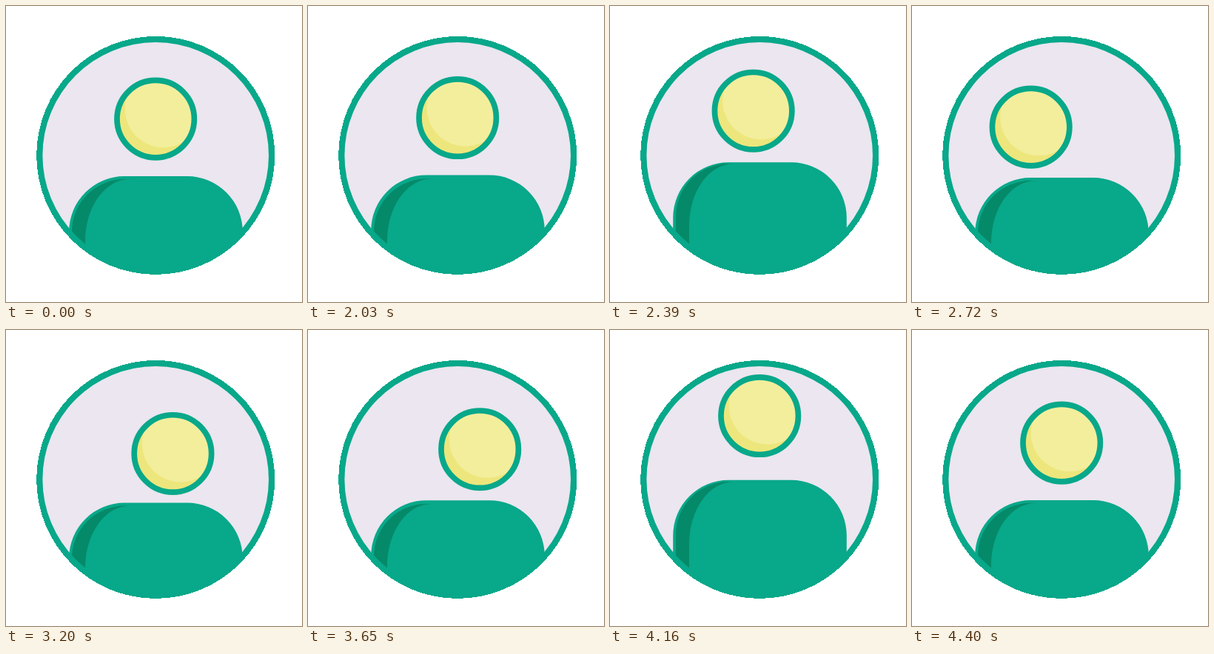
An HTML page for the animation above (4430 ms loop, 400x400 px).

```html
<!DOCTYPE html>
<html lang="en">
<head>
<meta charset="utf-8">
<title>Avatar looking around</title>
<style>
  html, body { margin: 0; width: 100%; height: 100%; overflow: hidden; background: #fff; }
  svg { display: block; width: 100%; height: 100%; }
</style>
</head>
<body>
<svg viewBox="0 0 400 400">
  <defs>
    <clipPath id="ringClip"><circle cx="202.2" cy="201.9" r="156"/></clipPath>
    <clipPath id="innerClip"><circle cx="202.2" cy="201.9" r="152.8"/></clipPath>
    <clipPath id="faceClip"><circle r="50"/></clipPath>
  </defs>
  <circle cx="202.2" cy="201.9" r="161" fill="#08a88a" shape-rendering="crispEdges"/>
  <circle cx="202.2" cy="201.9" r="152.8" fill="#ebe6ef"/>
  <g clip-path="url(#ringClip)">
    <path id="body" fill="#08a88a" d="M85.2 300V75A75 75 0 0 1 160.2 0H244.8A75 75 0 0 1 319.8 75V300Z"/>
  </g>
  <g clip-path="url(#innerClip)">
    <path id="shade" fill="#058a69" d="M89 300V75A71 71 0 0 1 160 4H167A60 84 0 0 0 107 88V300Z"/>
  </g>
  <g id="head">
    <circle r="50" fill="#ede67c"/>
    <circle cx="10.5" cy="-13.5" r="52" fill="#f3ee9c" clip-path="url(#faceClip)"/>
    <circle r="52.2" fill="none" stroke="#08a88a" stroke-width="7.7"/>
  </g>
</svg>
<script>
  const LOOP = 4430, STEP = 30, OFFSET = 20;
  const MID = 202.2, REST = 152.6, PEAK = 108.4, LOW = 163.5, SWAY = 42;
  const [body, shade, head] = ['body', 'shade', 'head'].map(id => document.getElementById(id));

  // Eased progress from 0 to 1 between two times
  const ease = (t, from, to) => {
    const p = Math.min(1, Math.max(0, (t - from) / (to - from)));
    return (1 - Math.cos(Math.PI * p)) / 2;
  };
  const mix = (a, b, p) => a + (b - a) * p;

  function headAt(t) {
    if (t < 2190) return [MID, mix(REST, PEAK, ease(t, 2008, 2190))];
    if (t < 2660) {
      // quarter arc from the peak down to the left
      const a = ease(t, 2190, 2640) * Math.PI / 2;
      return [MID - SWAY * (1 - Math.cos(a)), mix(PEAK, LOW, Math.sin(a))];
    }
    if (t < 3520) {
      // shallow swing to the right
      const p = ease(t, 2685, 3435);
      return [MID + SWAY * (2 * p - 1), LOW + 20 * p * (1 - p)];
    }
    if (t < 4070) {
      // quarter arc back up to the peak
      const a = ease(t, 3520, 3980) * Math.PI / 2;
      return [MID + SWAY * (1 - Math.sin(a)), mix(LOW, PEAK, 1 - Math.cos(a))];
    }
    return [MID, mix(PEAK, REST, ease(t, 4070, 4400))];
  }

  function bodyAt(t) {
    const top = 196, rest = 230, low = 232;
    if (t < 2230) return mix(rest, top, ease(t, 1998, 2230));
    if (t < 2600) return mix(top, low, ease(t, 2230, 2585));
    if (t < 3590) {
      const p = ease(t, 2685, 3435);
      return low + 8.5 * p * (1 - p);
    }
    if (t < 4060) return mix(low, top, ease(t, 3590, 4000));
    return mix(top, rest, ease(t, 4060, 4400));
  }

  const move = (el, x, y) => el.setAttribute('transform', `translate(${x.toFixed(2)} ${y.toFixed(2)})`);

  function draw(ms) {
    const t = Math.floor((ms % LOOP - OFFSET) / STEP) * STEP + OFFSET;
    move(head, ...headAt(t));
    move(body, 0, bodyAt(t));
    move(shade, 0, bodyAt(t - 14));
  }

  const start = performance.now();
  function tick() {
    draw(performance.now() - start);
    requestAnimationFrame(tick);
  }
  tick();
</script>
</body>
</html>
```
